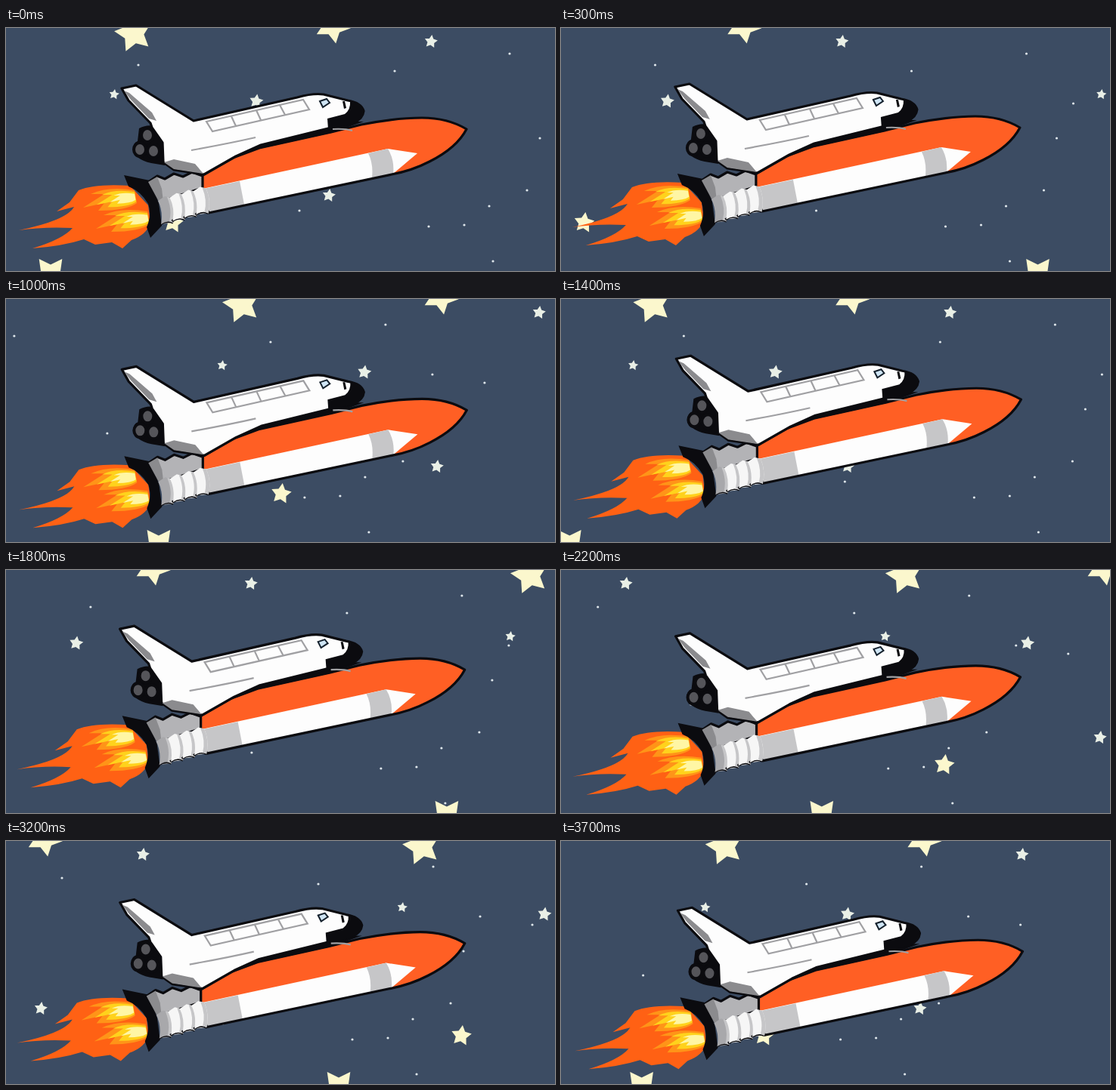
Animation, 726 px wide and 322 px high, one loop 3800 ms. Source, as an HTML page:

```html
<!DOCTYPE html>
<html lang="en">
<head>
<meta charset="utf-8">
<title>Shuttle in space</title>
<style>
html, body { margin: 0; width: 100%; height: 100%; overflow: hidden; background: #3c4c63; }
svg { display: block; width: 726px; height: 322px; }
.ink { stroke: #0b0b0f; stroke-width: 3.2; stroke-linejoin: round; }
.line { fill: none; stroke: #a0a0a3; stroke-width: 2.2; }
.black { fill: #0b0b0f; }
.white { fill: #fdfdfd; }
.grey { fill: #c6c6c8; }
.shade { fill: #8b8b8e; }
</style>
</head>
<body>
<svg viewBox="0 0 726 322">
  <g id="dots" fill="#dfe7ec"></g>
  <g id="stars"></g>

  <g id="flame">
    <path fill="#ff6114" d="M164 209Q118 206 96 215L84 231L67 243L90 237Q80 255 17 268Q50 263 88 265Q75 280 35 292Q75 289 103 280L118 287L140 284L154 292L166 281Q186 274 191 258L188 235Z"/>
  </g>

  <g id="ship">
    <!-- tank and booster -->
    <path id="tank" fill="#ff5f24" d="M255 198L300 172L335 159L430 138L470 128Q515 119 550 119Q584 119 609 134Q596 159 560 177Q537 189 510 194L268 245L258 220Z"/>
    <path class="white" d="M260 213L505 160L544 166L512 193L268 245Z"/>
    <path class="grey" d="M262 213L309 203L315 234L268 244ZM479 166L505 160Q514 175 512 193L484 198Q486 180 479 166Z"/>
    <use href="#tank" class="ink" style="fill-opacity:0"/>

    <!-- bell and skirts -->
    <path class="black" d="M156 195L190 202L202 232L206 262L191 278L186 264Q193 248 188 233Q178 216 162 210Z"/>
    <path class="ink" fill="#b3b3b6" d="M188 204L200 196L210 200L222 193L234 197L246 191L260 196V212L204 230Z"/>
    <path class="shade" d="M188 204L200 197L206 213L208 230H202Z"/>
    <g id="ribs"></g>

    <!-- orbiter -->
    <path class="black" d="M262 195L303 172L335 160L430 139L473 124L430 124L330 150ZM176 133Q190 126 198 132L210 152V182L192 179Q170 174 168 161Q168 152 174 150Z"/>
    <path class="white ink" d="M153 80L172 76L248 123L385 92Q406 86 420 88L452 96Q470 99 473 110Q472 120 460 125L426 133L337 155L304 170L262 194L222 188L208 178L207 152L193 132L191 126L162 96Z"/>
    <path class="shade" d="M156 83L163 86L193 112L199 123L189 120L165 95ZM209 178L222 174L250 180L261 193L222 187Z"/>
    <path class="black" d="M455 97Q470 99 474 110Q472 121 460 126L426 134L425 120L448 114Q456 108 455 97ZM445 97L448 97L450 106L447 107Z"/>
    <path class="line" d="M265 124L393 95L401 108L273 137ZM298 117L304 130M331 109L337 122M362 102L369 115M245 162Q295 153 330 145M432 134Q448 133 458 136"/>
    <path fill="#cfe5f5" stroke="#14202c" stroke-width="2" d="M415 97L424 94L428 99L419 105Z"/>
    <g id="engines" fill="#55555a" stroke="#0b0b0f" stroke-width="4"></g>
  </g>
</svg>
<script>
const $ = id => document.getElementById(id);
const add = (parent, tag, attrs) => {
  const el = document.createElementNS("http://www.w3.org/2000/svg", tag);
  for (const k in attrs) el.setAttribute(k, attrs[k]);
  return parent.appendChild(el);
};
const move = (el, x, y) => el.setAttribute("transform", `translate(${x} ${y})`);

const starPath = (r, turn) => "M" + Array.from({ length: 10 }, (_, i) => {
  const a = (turn + i * 36) * Math.PI / 180, d = i % 2 ? r * 0.52 : r;
  return [d * Math.cos(a), d * Math.sin(a)].map(v => v.toFixed(1));
}).join("L") + "Z";

// x, y, radius, turn
const stars = [
  [169, 7, 26, 42], [432, -3, 24, 80], [59, 327, 26, 90], [221, 258, 14],
  [562, 18, 9], [143, 88, 7], [331, 97, 9.5], [427, 222, 9]
].map(([x, y, r, turn = 62]) => {
  const fill = r > 12 ? "#fbf7cd" : "#e9efe6";
  return { x, y, el: add($("stars"), "path", { d: starPath(r, turn), fill }) };
});

for (const [cx, cy] of [[175, 49], [514, 57], [666, 34], [706, 146], [689, 215], [639, 236],
  [606, 261], [559, 263], [644, 309], [388, 242], [298, 178], [728, 100], [797, 111]])
  add($("dots"), "circle", { cx, cy, r: 1.6 });

// two jets of nested tongues
const tongue = "M0 -9Q-35 -15 -58 -4L-40 -4L-68 14L-40 8L-48 18Q-10 18 3 8Z";
for (const [x, y] of [[170, 224], [187, 252]])
  ["#ff9418", "#ffd21c", "#fff6a4"].forEach((fill, i) =>
    add($("flame"), "path", { d: tongue, fill, transform: `translate(${x} ${y}) scale(${1 - i * 0.26})` }));

for (let i = 0; i < 4; i++) {
  const g = add($("ribs"), "g", {});
  move(g, 202 + i * 15.5, 229 - i * 4.2);
  add(g, "path", { class: "ink", fill: i ? "#f6f6f6" : "#a8a8ab", d: "M2 31Q11 25 19 29" });
  add(g, "path", { fill: i ? "#f6f6f6" : "#a8a8ab", d: "M-1 0L8 -6L16 -4Q23 12 19 29Q11 25 3 31Q6 14 -1 0Z" });
  add(g, "path", { class: "grey", d: "M11 -5L16 -4Q23 12 19 29L14 27Q18 12 11 -5Z" });
}

for (const [cx, cy] of [[187, 142], [177, 161], [195, 163]])
  add($("engines"), "ellipse", { cx, cy, rx: 8, ry: 9 });

const mix = (keys, x) => {
  const i = Math.max(1, keys.findIndex(k => k[0] >= x));
  const [x0, y0] = keys[i - 1], [x1, y1] = keys[i];
  return y0 + (y1 - y0) * (x - x0) / (x1 - x0);
};
const smooth = t => (t = Math.min(1, Math.max(0, t)), t * t * (3 - 2 * t));

// three flights of 16 steps, unevenly paced over 38 ticks
const CYCLE = 16, TILE = 762, DRIFT = 202, TICKS = 38;
const pace = [[0, 0], [10, 13], [18, 21], [27, 32], [32, 40], [TICKS, 48]];

function draw(ms) {
  const step = Math.round(mix(pace, Math.floor(ms / 100) % TICKS)) % CYCLE;
  const p = step / CYCLE;
  for (const s of stars) move(s.el, (s.x - p * TILE + 30 + TILE) % TILE - 30, s.y);
  move($("dots"), -p * DRIFT, 0);
  const x = -2.5 * Math.sin(step * Math.PI / 12.5);
  const y = 11.5 * smooth((step - 6.5) / 6.5) - 2 * Math.sin(p * 2 * Math.PI);
  move($("ship"), x, y);
  move($("flame"), x, y - 2 * Math.min(1, step / 4));
}

const start = performance.now();
(function tick() {
  draw(performance.now() - start);
  requestAnimationFrame(tick);
})();
</script>
</body>
</html>
```
